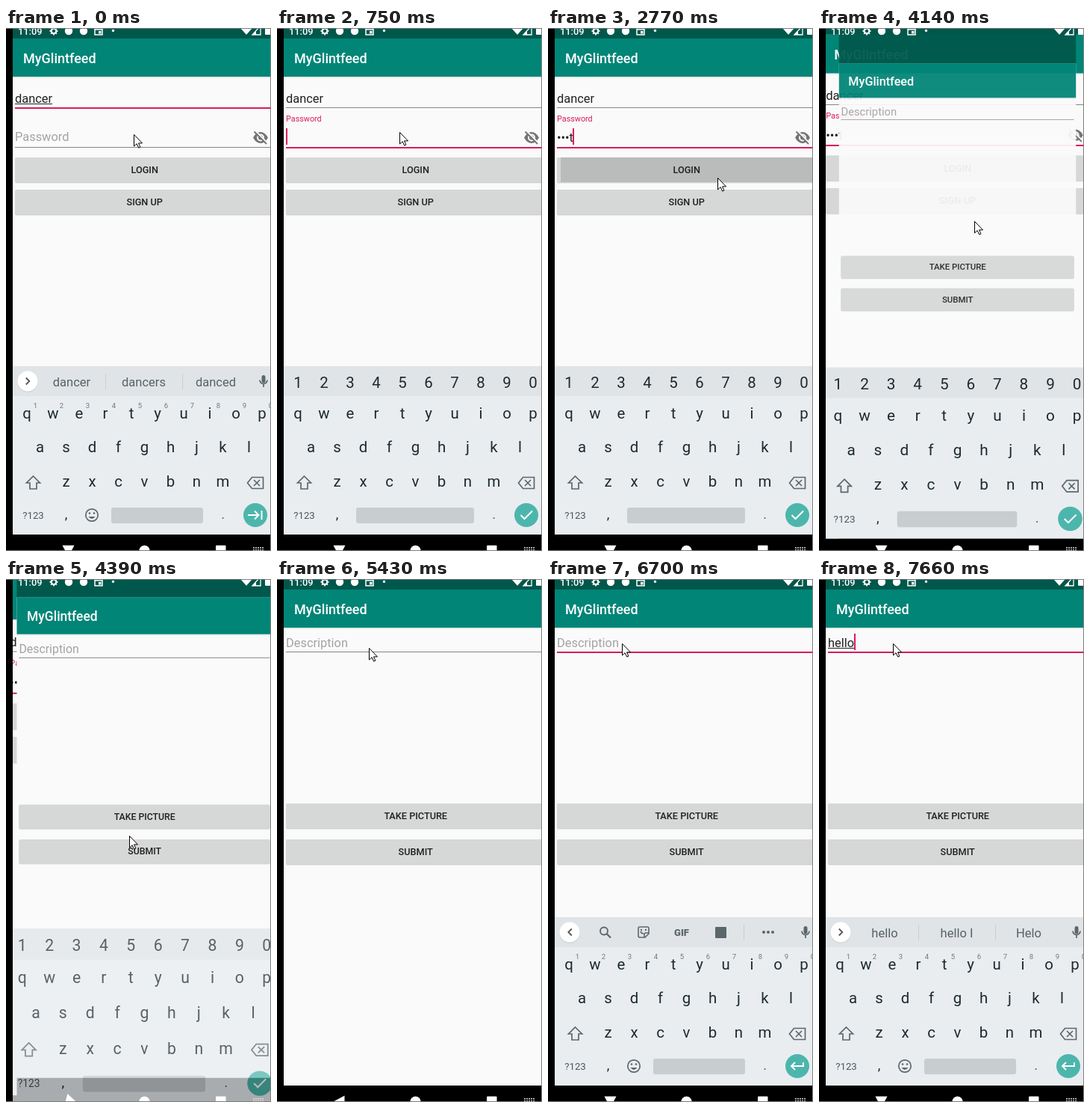
An HTML page with a canvas that plays this animation: 355 px wide and 699 px high, repeating every 8 s.

```html
<!DOCTYPE html>
<html lang="en">
<head>
<meta charset="utf-8">
<title>Login and post</title>
<style>
html, body { margin: 0; width: 100%; height: 100%; overflow: hidden; background: #000; }
canvas { display: block; }
</style>
</head>
<body>
<canvas id="stage" width="355" height="699"></canvas>
<script>
const stage = document.getElementById('stage').getContext('2d');
const buffer = new OffscreenCanvas(355, 699).getContext('2d');
let ctx = stage;
const LOOP = 8000;
const PINK = '#d81b60', INK = '#212121', HINT = '#a3a3a3', KEY = '#1d2a30', ICON = '#5c676c';

// The picture only changes at these times.
const STEPS = [0, 160, 440, 590, 750, 900, 1080, 1230, 1380, 1520, 1660, 1800, 1950, 2090,
  2220, 2360, 2770, 2910, 3060, 3490, 4020, 4140, 4270, 4390, 4530, 4650, 5030, 5170,
  5300, 5430, 6140, 6280, 6420, 6560, 6700, 7100, 7240, 7380, 7520, 7660];

// Pointer path: time, x, y.
const POINTER = [[0, 171, 142], [160, 164, 139], [1380, 164, 139], [1520, 168, 150],
  [1800, 207, 220], [2090, 224, 235], [2360, 227, 200], [3490, 227, 200], [4140, 208, 258],
  [4390, 165, 343], [4650, 168, 343], [5030, 165, 225], [5170, 136, 145], [5300, 127, 105],
  [5430, 123, 92], [6140, 99, 86], [LOOP, 99, 86]];

const SUGGESTIONS = [['h', 'hi', 'he'], ['he', 'hey', 'her'], ['hello', 'help', 'hell'],
  ['hell', 'hello', 'Hell'], ['hello', 'hello I', 'Helo']];

const clamp = v => Math.min(1, Math.max(0, v));
const mix = (a, b, p) => a + (b - a) * p;

function rect(x, y, w, h, color, r = 0) {
  ctx.fillStyle = color;
  ctx.beginPath();
  ctx.roundRect(x, y, w, h, r);
  ctx.fill();
}

function disc(x, y, r, color) {
  rect(x - r, y - r, 2 * r, 2 * r, color, r);
}

function text(s, x, y, size, color, align = 'left', weight = 400) {
  ctx.font = `${weight} ${size}px Roboto, sans-serif`;
  ctx.textAlign = align;
  ctx.fillStyle = color;
  ctx.fillText(s, x, y);
}

// Fills a path, or strokes it when a line width is given.
function shape(d, x, y, color, width) {
  ctx.save();
  ctx.translate(x, y);
  ctx.fillStyle = ctx.strokeStyle = color;
  const path = new Path2D(d);
  if (width) { ctx.lineWidth = width; ctx.stroke(path); } else ctx.fill(path);
  ctx.restore();
}

function ring(x, y, r, color, width) {
  ctx.strokeStyle = color;
  ctx.lineWidth = width;
  ctx.beginPath();
  ctx.arc(x, y, r, 0, 7);
  ctx.stroke();
}

// Draws a group zoomed about the screen centre, faded as a whole.
function layer(alpha, scale, shift, draw) {
  if (alpha <= 0) return;
  ctx = buffer;
  ctx.clearRect(0, 0, 355, 699);
  ctx.save();
  ctx.translate(185.5, 345);
  ctx.scale(scale, scale);
  ctx.translate(-185.5, shift - 345);
  draw();
  ctx.restore();
  ctx = stage;
  ctx.globalAlpha = alpha;
  ctx.drawImage(buffer.canvas, 0, 0);
  ctx.globalAlpha = 1;
}

function appFrame() {
  rect(9, 14, 353, 663, '#fafafa');
  rect(9, 65, 353, 1, '#d5dedd');
  rect(9, 66, 353, 1, '#eef1f1');
  rect(9, 14, 353, 51, '#008577');
  rect(9, -40, 353, 54, '#00574b');
  rect(9, 677, 353, 60, '#000');
  text('MyGlintfeed', 23, 47, 18, '#fff', 'left', 500);
}

function button(label, y, pressed = 0) {
  rect(12, y + 1, 347, 34, '#ececec', 2);
  rect(12, y + 1, 347, 33, '#cfd0d0', 2);
  rect(12, y, 347, 33, '#d6d7d7', 2);
  if (pressed) rect(17, y, 342, 33, `rgba(0,0,0,${pressed})`);
  text(label, 185.7, y + 21, 12.7, INK, 'center', 500);
}

function field(y, focused) {
  rect(12, y, 347, focused ? 2 : 1, focused ? PINK : '#868686');
}

function entry(s, y, underlined, caret) {
  text(s, 12, y, 16.4, INK);
  const w = ctx.measureText(s).width;
  if (underlined) rect(12, y + 1, w, 1, INK);
  if (caret) rect(Math.round(12 + w - 0.5), y - 18, 2, 22, PINK);
}

function eyeOff(x, y) {
  const slash = 'M-8.5-8L8 8.5';
  shape('M-10 0Q-6-7.5 0-7.5T10 0Q6 7.5 0 7.5T-10 0Z', x, y, '#757575');
  disc(x, y, 5, '#fafafa');
  disc(x, y, 3, '#757575');
  shape(slash, x + 1.3, y - 1.3, '#fafafa', 2);
  shape(slash, x, y, '#757575', 1.9);
}

function loginScreen(t) {
  appFrame();
  const onPassword = t >= 440;
  entry('dancer', 100, !onPassword);
  field(106, !onPassword);
  const p = clamp((t - 380) / 190);
  text('Password', 12, mix(151, 125, p), mix(16.4, 10.8, p), onPassword ? PINK : HINT);
  const typed = [900, 1080, 1230, 1380].filter(k => t >= k).length;
  const shown = typed ? '•'.repeat(typed - 1) + 'test'[typed - 1] : '';
  // The caret blinks once typing has stopped.
  const caretOn = t < 1350 || Math.floor((t - 1350) / 500) % 2 === 0;
  entry(shown, 152, false, onPassword && caretOn);
  field(159, onPassword);
  eyeOff(341, 146.5);
  button('LOGIN', 173, t >= 2770 ? 0.13 * clamp((3060 - t) / 290) : 0);
  button('SIGN UP', 216);
}

function postScreen(t) {
  appFrame();
  const typed = lettersTyped(t);
  if (typed) entry('hello'.slice(0, typed), 91, true, true);
  else text('Description', 12, 91, 16.4, HINT);
  field(97, t >= 6280);
  button('TAKE PICTURE', 300);
  button('SUBMIT', 348);
}

function lettersTyped(t) {
  return t < 7100 ? 0 : Math.min(5, Math.floor((t - 7100) / 140) + 1);
}

function letterRow(chars, x, y) {
  [...chars].forEach((c, i) => text(c, x + 35 * i, y, 20.4, KEY, 'center'));
}

function mic(x, y) {
  rect(x - 2.5, y - 8, 5, 10.5, ICON, 2.5);
  shape('M-5-1.5A5 5 0 0 0 5-1.5M0 4V8', x, y, ICON, 1.7);
}

function stripEdges(chevron) {
  disc(29, 473, 14, '#d3d7da');
  disc(29, 472, 13.5, '#fff');
  shape(chevron, 29.3, 472, '#555', 1.8);
  mic(345, 472);
}

function wordStrip(words) {
  stripEdges('M-2.5-4.5L2 0L-2.5 4.5');
  words.forEach((w, i) => text(w, 88 + 96.5 * i, 479, 16.5, '#566268', 'center'));
  rect(133, 462, 1, 21, '#c9ced1');
  rect(236, 462, 1, 21, '#c9ced1');
}

function toolStrip() {
  stripEdges('M2.5-4.5L-2 0L2.5 4.5');
  ring(75, 470.5, 5, ICON, 1.9);
  shape('M3.5 3.5L9 9', 75, 470.5, ICON, 2.2);
  shape('M-7-5Q-7-7-5-7H5Q7-7 7-5V2L2 7H-5Q-7 7-7 5ZM7 1H3Q1 1 1 3V7M-4-1Q-3 2 0 2', 128, 472, ICON, 1.6);
  disc(125, 469, 1.2, ICON);
  disc(131, 469, 1.2, ICON);
  text('GIF', 179, 477, 13, ICON, 'center', 900);
  rect(224, 465, 15, 15, ICON, 1);
  rect(262, 462, 1, 21, '#c9ced1');
  [-6, 0, 6].forEach(d => disc(295 + d, 472, 2, ICON));
}

function keyboard(strip, enterIcon) {
  rect(9, 452, 353, 225, '#e9edf0');
  rect(9, 452, 353, 40, '#e0e4e7');
  const digits = strip === 'digits';
  if (digits) letterRow('1234567890', 28, 481);
  else if (strip === 'tools') toolStrip();
  else wordStrip(strip);

  letterRow('qwertyuiop', 28, 522);
  if (!digits) [...'1234567890'].forEach((c, i) => text(c, 39.5 + 35 * i, 508, 9.5, '#6d787d', 'center'));
  letterRow('asdfghjkl', 45.5, 567);
  letterRow('zxcvbnm', 80.5, 613);
  shape('M0-9L9 0H4.5V8H-4.5V0H-9Z', 36.5, 608, ICON, 1.7);
  shape('M-11 0L-5-7.5H10V7.5H-5ZM-2.5-4L5.5 4M5.5-4L-2.5 4', 334.5, 608, ICON, 1.7);

  text('?123', 36.5, 656, 13.2, '#4a565c', 'center');
  text(',', 80.5, 656, 18, KEY, 'center');
  text('.', 290.5, 656, 18, '#58646a', 'center');
  const space = digits ? 106 : 141;
  rect(space, 641, 264 - space, 21, '#c8cdd0', 3);
  if (!digits) {
    ring(115, 651, 8.2, ICON, 1.7);
    disc(112, 648.5, 1.3, ICON);
    disc(118, 648.5, 1.3, ICON);
    shape('M-4.5 2Q0 8 4.5 2Z', 115, 651, ICON);
  }
  disc(334, 651, 16, '#4db6ac');
  shape(enterIcon, 334, 651, '#fff', 2);
}

const ENTER_ICONS = {
  next: 'M-10 0H4M-1-5.5L4.5 0L-1 5.5M8.5-6V6',
  done: 'M-7.5 0L-2.5 5L8-5.5',
  newline: 'M8-5V0H-7M-3-5L-8 0L-3 5'
};

function currentKeyboard(t) {
  if (t < 590) keyboard(['dancer', 'dancers', 'danced'], ENTER_ICONS.next);
  else if (t < 5000) keyboard('digits', ENTER_ICONS.done);
  else keyboard(t < 7100 ? 'tools' : SUGGESTIONS[lettersTyped(t) - 1], ENTER_ICONS.newline);
}

function statusBar() {
  text('11:09', 16, 9, 12.8, '#fff', 'left', 500);
  ring(64, 4, 3.3, '#fff', 2.2);
  for (let i = 0; i < 8; i++) {
    const a = i * Math.PI / 4;
    disc(64 + 4.7 * Math.cos(a), 4 + 4.7 * Math.sin(a), 1, '#fff');
  }
  disc(84, 4, 5.2, '#fff');
  disc(104, 4, 5.2, '#fff');
  shape('M-5-6H5V5H-5ZM-5-2H5', 124, 4, '#fff', 1.5);
  rect(124, 4, 3.5, 3.5, '#fff');
  disc(143.5, 3.5, 1.7, '#fff');
  shape('M-8-3Q0-9 8-3L0 6Z', 322, 3, '#fff');
  shape('M5-7V5H-6Z', 336, 4, '#fff', 1.3);
  shape('M-1 5H-6L-1 0Z', 336, 4, '#fff');
  rect(347, -4, 8, 13, '#fff', 1);
}

function navBar(keyboardUp) {
  ctx.save();
  ctx.translate(83.5, 698.5);
  ctx.rotate((1 - keyboardUp ** 2) * Math.PI / 2);
  shape('M-8-7H8L0 8Z', 0, 0, '#fff');
  ctx.restore();
  disc(185.5, 698.5, 7, '#fff');
  rect(281, 691.5, 13.5, 13, '#fff', 1);
  for (let x = 331; x < 346; x += 3) {
    rect(x, 694, 2, 1.5, '#ddd');
    rect(x, 697, 2, 1.5, '#ddd');
  }
}

function pointer(t) {
  const i = POINTER.findIndex(k => k[0] > t);
  const [a, b] = [POINTER[i - 1], POINTER[i]];
  const p = (t - a[0]) / (b[0] - a[0]);
  const x = Math.round(mix(a[1], b[1], p)) + 0.5, y = Math.round(mix(a[2], b[2], p)) + 0.5;
  const arrow = 'M0 0V15.5L3.6 12.2L6.2 17.6L8.4 16.6L6 11.4H11Z';
  shape(arrow, x, y, '#fff');
  shape(arrow, x, y, '#000', 1);
}

function render(t) {
  const opening = clamp((t - 4000) / 600);
  const eased = 1 - (1 - opening) ** 1.5;
  const keyboardUp = t < 5000 ? 1 - clamp((t - 4310) / 290) : clamp((t - 6330) / 280);
  const oldScale = t < 5000 ? 1 + 0.05 * eased : 1;

  rect(0, 0, 355, 699, '#000');
  ctx.save();
  ctx.beginPath();
  ctx.rect(9, 1, 345, 697);
  ctx.clip();
  if (opening < 1) layer(1, oldScale, 0, () => loginScreen(t));
  layer(clamp(opening * 4), 0.85 + 0.15 * eased, 0, () => postScreen(t));
  layer(keyboardUp, oldScale, 38 * (1 - keyboardUp), () => currentKeyboard(t));
  statusBar();
  navBar(keyboardUp);
  pointer(t);
  ctx.restore();

  rect(0, 0, 355, 1, '#7d7d7d');
  rect(354, 0, 1, 699, '#7d7d7d');
  rect(0, 698, 355, 1, '#7d7d7d');
}

const start = performance.now();
function tick() {
  const t = (performance.now() - start) % LOOP;
  render(STEPS.findLast(s => s <= t));
  requestAnimationFrame(tick);
}
tick();
</script>
</body>
</html>
```
